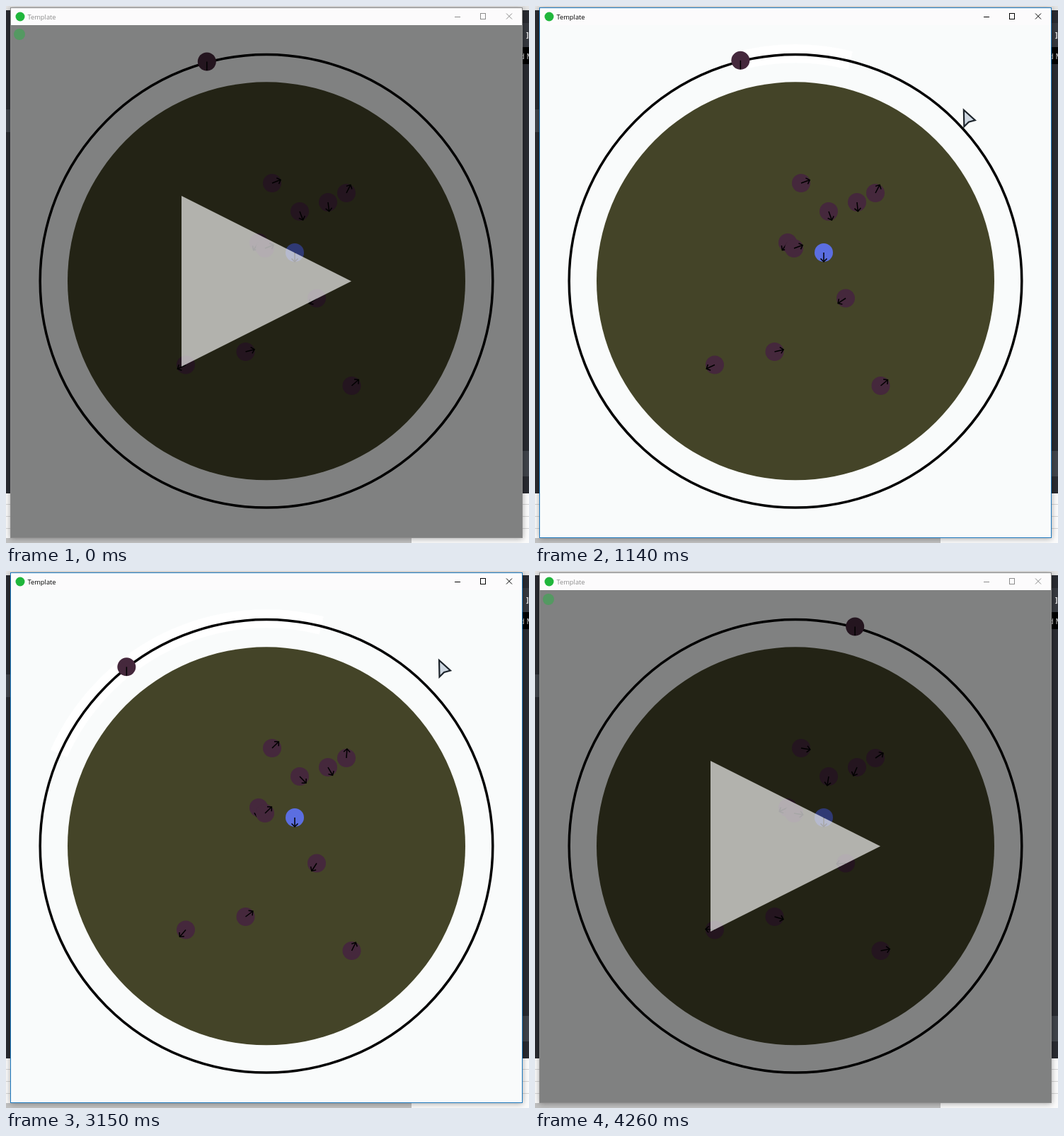
An HTML page with a canvas for the animation above (4.32 s loop, 739x758 px).

```html
<!DOCTYPE html>
<html>
<head>
<meta charset="utf-8">
<style>
html, body { margin: 0; width: 100%; height: 100%; overflow: hidden; background: #fff; }
canvas { display: block; }
</style>
</head>
<body>
<canvas id="stage" width="739" height="758"></canvas>
<script>
const g = document.getElementById('stage').getContext('2d');
const LOOP = 4320, STEP = 30, CX = 368, CY = 388.3, R = 321;
const PLUM = '#45283c', BLUE = '#5b6ee1', PAPER = '#f9fbfb';
const rad = d => d * Math.PI / 180;

// The orbiting ball runs between these angles (degrees clockwise from the top)
// at constant speed and rests for one step at each turn.
const SPEED = 2 / STEP, SET_OFF = 252, FIRST = -15.2;
const turns = [14, -28, -16, -36, -31, -66, -34, -46, 15.2];

// x, y, arrow heading relative to the orbit angle
const balls = [
  [376, 250, -6], [415, 290, 84], [455, 277, 98], [481, 264, -48], [357, 334, 140],
  [366, 342, -6], [439, 412.5, 161], [338.5, 488, 1], [254, 506.5, 169], [488.5, 536, -26]
];

function orbit(t) {
  let angle = FIRST, lo = FIRST, hi = FIRST, clock = SET_OFF;
  for (const goal of turns) {
    if (t <= clock) break;
    const way = goal - angle;
    const gone = Math.min(Math.abs(way), (t - clock) * SPEED);
    clock += Math.abs(way) / SPEED + STEP;
    angle += Math.sign(way) * gone;
    lo = Math.min(lo, angle);
    hi = Math.max(hi, angle);
  }
  return { angle, lo, hi };
}

function glide(t, from, to, a, b) {
  const k = Math.min(1, Math.max(0, (t - from) / (to - from)));
  return a.map((v, i) => v + (b[i] - v) * k);
}

function pointer(t) {
  const rest = [612, 126];
  return t < 2000 ? glide(t, 600, 1350, [590, 200], rest)
                  : glide(t, 3510, 4020, rest, [760, 54]);
}

function rect(color, x, y, w, h) {
  g.fillStyle = color;
  g.fillRect(x, y, w, h);
}

function disc(color, x, y, r) {
  g.fillStyle = color;
  g.beginPath();
  g.arc(x, y, r, 0, 7);
  g.fill();
}

function arc(color, width, r, from = 0, to = 360) {
  g.strokeStyle = color;
  g.lineWidth = width;
  g.beginPath();
  g.arc(CX, CY, r, rad(from - 90), rad(to - 90));
  g.stroke();
}

function trace(...pts) {
  g.beginPath();
  for (let i = 0; i < pts.length; i += 2) g.lineTo(pts[i], pts[i + 1]);
}

function line(color, width, ...pts) {
  g.strokeStyle = color;
  g.lineWidth = width;
  trace(...pts);
  g.stroke();
}

function text(str, color, font, x, y) {
  g.fillStyle = color;
  g.font = font + ' "Open Sans", sans-serif';
  g.fillText(str, x, y);
}

function ball(color, x, y, heading, head = true) {
  disc(color, x, y, 13);
  g.save();
  g.translate(x, y);
  g.rotate(rad(heading));
  line('#000', 1.5, 0, 0, 12.5, 0);
  if (head) line('#000', 1.5, 8.5, -4.5, 13, 0, 8.5, 4.5);
  g.restore();
}

function desktop() {
  rect('#e4e4e4', 0, 0, 739, 6);
  rect('#292b31', 0, 6, 739, 682);
  rect('#41454c', 0, 146, 8, 32);
  rect('#36393f', 729, 24, 10, 34);
  rect('#000', 729, 58, 10, 24);
  rect('#40444b', 729, 628, 10, 36);
  rect('#fbfbfb', 0, 688, 739, 70);
  for (let y = 703; y < 750; y += 17) rect('#d4d4d4', 0, y, 739, 1);
  rect('#c1c1c1', 0, 751, 573, 7);
  text(']', '#e8e8e8', 'bold 11px', 735, 45);
  text('d M', '#e8e8e8', '11px', 726, 75);
}

function appWindow(active) {
  const ink = active ? '#000' : '#8c8c8c';
  g.save();
  g.shadowColor = 'rgba(0,0,0,.35)';
  g.shadowBlur = 8;
  g.shadowOffsetY = 1;
  rect(active ? '#1c77bd' : '#8a8a8a', 6, 2, 724, 749);
  g.restore();
  rect('#fcfbfc', 7, 3, 722, 24);
  rect(PAPER, 7, 27, 722, 723);
  disc('#20b63c', 20, 15, 6.5);
  text('Template', ink, '9.3px', 30.5, 18.5);
  line(ink, 1, 634, 15.5, 642, 15.5);
  g.strokeRect(670.5, 10.5, 7, 8);
  line(ink, 1, 707, 10.5, 715, 18.5);
  line(ink, 1, 715, 10.5, 707, 18.5);
}

function overlay() {
  rect('rgba(0,0,0,.487)', 7, 27, 722, 723);
  trace(248, 268, 488, 388.5, 248, 509);
  g.fillStyle = 'rgba(255,255,255,.65)';
  g.fill();
  disc('rgba(32,182,60,.45)', 19, 40, 8);
}

function cursor(x, y) {
  g.save();
  g.translate(x, y);
  trace(0, 0, 0.5, 23.5, 7, 17, 16, 14.5);
  g.closePath();
  g.fillStyle = '#cfd8e2';
  g.fill();
  g.strokeStyle = '#1d242b';
  g.lineWidth = 2.2;
  g.stroke();
  g.restore();
}

function draw(t) {
  const { angle, lo, hi } = orbit(t), paused = t < 90 || t >= 4260;
  desktop();
  appWindow(!paused);
  if (!paused) arc('#fff', 26, R, lo, hi);   // faint trail of the ball
  arc('#000', 3.5, 319.8);
  disc('#444428', CX, CY, 281);
  for (const [x, y, turn] of balls) ball(PLUM, x, y, turn + angle);
  ball(BLUE, 408, 348, 90);
  ball(PLUM, CX + R * Math.sin(rad(angle)), CY - R * Math.cos(rad(angle)), 90, false);
  if (paused) overlay();
  else cursor(...pointer(t));
}

const start = performance.now();
function tick() {
  const t = (performance.now() - start) % LOOP;
  draw(Math.floor(t / STEP) * STEP);
  requestAnimationFrame(tick);
}
tick();
</script>
</body>
</html>
```
